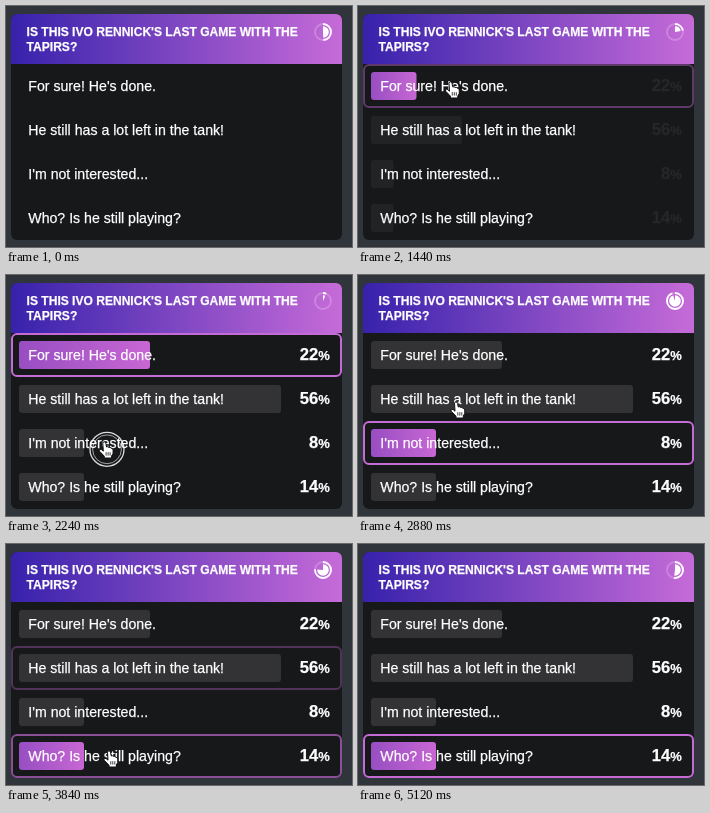
Recreate the animation shown at these times as an HTML page. Size 346x241 px, loop 5.28 s.

```html
<!DOCTYPE html>
<html lang="en">
<head>
<meta charset="utf-8">
<title>Poll</title>
<style>
  html, body { margin: 0; width: 100%; height: 100%; overflow: hidden; background: #30343b; }
  svg { display: block; }
  text { fill: #fff; stroke: #fff; stroke-width: .25px; font-family: "Liberation Sans", Arial, sans-serif; }
  .title { font-size: 12.05px; font-weight: bold; }
  .option { font-size: 14.15px; }
  .share { font-size: 16.6px; font-weight: bold; text-anchor: end; }
  .share tspan { font-size: 13px; }
</style>
</head>
<body>
<svg width="346" height="241" viewBox="0 0 346 241">
  <defs>
    <linearGradient id="head"><stop stop-color="#3722ac"/><stop offset="1" stop-color="#c66bd8"/></linearGradient>
    <linearGradient id="pick"><stop stop-color="#984ec2"/><stop offset="1" stop-color="#c767d3"/></linearGradient>
    <clipPath id="card"><rect x="5" y="8" width="331" height="226" rx="6"/></clipPath>
  </defs>
  <g clip-path="url(#card)">
    <rect x="5" y="8" width="331" height="226" fill="#17181a"/>
    <rect x="5" y="8" width="331" height="50" fill="url(#head)"/>
  </g>
  <text class="title" x="20.6" y="30">IS THIS IVO RENNICK'S LAST GAME WITH THE</text>
  <text class="title" x="20.6" y="45">TAPIRS?</text>
  <g transform="translate(317 26) rotate(-90)" fill="none" stroke="#fff">
    <circle r="8" stroke-width="1.8" opacity=".22"/>
    <circle id="arc" r="8" stroke-width="1.8" pathLength="100"/>
    <circle id="pie" r="2.9" stroke-width="5.8" pathLength="100"/>
  </g>
  <g id="rows"></g>
  <g id="cursor">
    <g id="click" fill="none" stroke="#fff" transform="translate(2.7 7.3)">
      <circle r="17" stroke-width="1.3" opacity=".85"/>
      <circle r="14.4" stroke-width="1" opacity=".6"/>
    </g>
    <path fill="#fff" stroke="#111" stroke-width="1" stroke-linejoin="round"
      d="M-1.5 1.2Q-1.3 -.3 0 -.2Q1.2 0 1.5 1.4L2.3 5Q3.6 4.2 4.6 5.4Q6 4.9 6.8 6.2Q8.6 6 8.8 8L8.7 11.5L7.3 14V16H0V14.2L-4.8 9.2Q-5.6 7.7 -4.2 7.3Q-3 7.1 -1 9.2Z"/>
    <path fill="none" stroke="#111" stroke-width=".8" d="M1.8 10.2V13.6M3.8 10.2V13.6M5.8 10.2V13.6"/>
  </g>
</svg>
<script>
const LOOP = 5280, STEP = 160, FADE = 240, REVEAL = 1340, EMPTY = 2600;
const options = [
  ["For sure! He's done.", 22, 131],
  ["He still has a lot left in the tank!", 56, 262],
  ["I'm not interested...", 8, 65],
  ["Who? Is he still playing?", 14, 65]
];
// [time, option]
const picks = [[REVEAL, 0], [2320, 2], [2960, 1], [3680, 3]];
const clicks = [1040, 2180, 2900, 3580];
// [time, x, y] of the fingertip
const path = [
  [640, 92.5, 76], [1480, 92.5, 76], [2080, 98.3, 167], [2360, 98.3, 167], [2760, 98, 127],
  [3000, 98, 127], [3440, 103, 207], [3960, 103, 207], [4440, 106, 252]
];

const $ = id => document.getElementById(id);
const ramp = (t, start, span) => Math.min(1, Math.max(0, (t - start) / span));
const set = (el, attrs) => { for (const k in attrs) el.setAttribute(k, attrs[k]); };
const add = (parent, tag, attrs, text = "") => {
  const el = document.createElementNS("http://www.w3.org/2000/svg", tag);
  set(el, attrs);
  el.textContent = text;
  return parent.appendChild(el);
};

const rows = options.map(([label, percent, width], i) => {
  const g = add($("rows"), "g", { transform: `translate(0 ${58 + 44 * i})` });
  const border = add(g, "rect", { x: 6, y: 1, width: 329, height: 42, rx: 5, fill: "none", stroke: "#c56bd6", "stroke-width": 2 });
  const bar = add(g, "rect", { x: 13, y: 8, height: 28, rx: 3 });
  add(g, "text", { class: "option", x: 22.3, y: 27 }, label);
  const share = add(g, "text", { class: "share", x: 323.8, y: 27 }, percent);
  add(share, "tspan", {}, "%");
  return { border, bar, share, width };
});

function cursorAt(t) {
  const i = path.findIndex(p => p[0] > t);
  if (i < 0) return path[path.length - 1].slice(1);
  if (i === 0) return path[0].slice(1);
  const [a, ax, ay] = path[i - 1], [b, bx, by] = path[i];
  const u = ramp(t, a, b - a), e = u * u * (3 - 2 * u);
  return [ax + (bx - ax) * e, ay + (by - ay) * e];
}

function draw(t) {
  const left = 1 - ((t - EMPTY + LOOP) % LOOP) / LOOP;
  for (const id of ["arc", "pie"]) set($(id), { "stroke-dasharray": `${left * 100} 100` });

  const grow = ramp(t, REVEAL, 288);
  const now = picks.findLastIndex(p => p[0] <= t);
  const fade = now < 0 ? 0 : ramp(t, picks[now][0], FADE);
  rows.forEach(({ border, bar, share, width }, i) => {
    const picked = now >= 0 && picks[now][1] === i;
    const before = now > 0 && picks[now - 1][1] === i;
    set(border, { opacity: picked ? fade : before ? 1 - fade : 0 });
    set(bar, {
      width: width * grow,
      fill: picked ? "url(#pick)" : "#333335",
      opacity: picked ? 1 : Math.min(1, grow * 1.2)
    });
    set(share, { opacity: ramp(t, 1420, 350) });
  });

  set($("cursor"), { transform: `translate(${cursorAt(t)})`, opacity: ramp(t, 560, 240) });
  set($("click"), { opacity: clicks.some(c => t >= c && t < c + 160) ? 1 : 0 });
}

const start = performance.now();
function frame() {
  const t = (performance.now() - start) % LOOP;
  draw(Math.floor(t / STEP) * STEP);
  requestAnimationFrame(frame);
}
frame();
</script>
</body>
</html>
```
